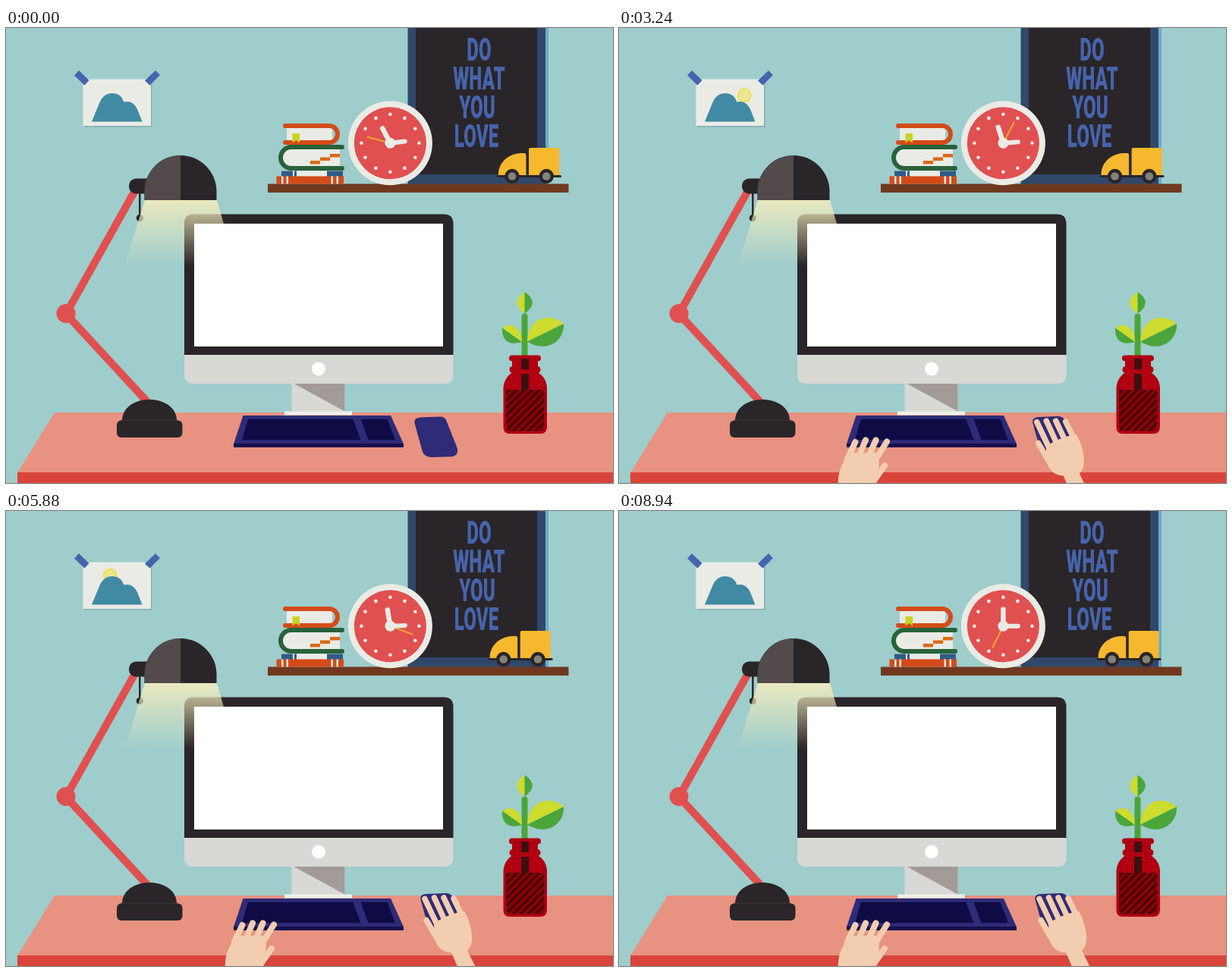
Animation of 800x600 px, one loop 9 s. Source, as an HTML page:

```html
<!DOCTYPE html>
<html lang="en">
<head>
<meta charset="utf-8">
<title>Desk</title>
<style>
  html, body { margin: 0; width: 100%; height: 100%; overflow: hidden; background: #9ecdcc; }
  svg { display: block; width: 100vw; height: 100vh; }
  .motto { font: 900 42.5px Roboto, "Liberation Sans", sans-serif; fill: #4664ad; text-anchor: middle; }
  .ink { fill: #2a2528; }
  .paper { fill: #ebebe6; }
  .lime { fill: #cddc2e; }
  .leaf { fill: #4aa53a; }
  .glass { fill: #b00012; }
  .line { fill: none; stroke-linecap: round; }
  .skin { fill: #f3cdaf; stroke: #f3cdaf; stroke-linecap: round; }
</style>
</head>
<body>
<svg viewBox="0 0 800 600" preserveAspectRatio="none">
  <defs>
    <linearGradient id="glow" gradientUnits="userSpaceOnUse" x1="0" y1="227" x2="0" y2="314">
      <stop offset="0" stop-color="#f2ebbd" stop-opacity=".9"/>
      <stop offset="1" stop-color="#f2ebbd" stop-opacity="0"/>
    </linearGradient>
    <pattern id="hatch" width="7" height="7" patternUnits="userSpaceOnUse" patternTransform="rotate(45)">
      <rect width="7" height="7" fill="#8a0009"/>
      <rect width="3" height="7" fill="#3f0808"/>
    </pattern>
    <clipPath id="sheet"><rect x="101.5" y="67.5" width="89.5" height="61"/></clipPath>
  </defs>

  <rect width="800" height="600" fill="#9ecdcc"/>

  <g id="poster">
    <rect x="711" width="4" height="206" fill="#70a9c9"/>
    <rect x="529.5" width="181.5" height="206" fill="#30486a"/>
    <rect class="ink" x="540" width="160" height="193"/>
  </g>

  <g id="sketch">
    <rect x="103" y="69" width="89.5" height="61.5" fill="#86aeb2"/>
    <rect class="paper" x="101.5" y="67.5" width="89.5" height="61.5"/>
    <g clip-path="url(#sheet)">
      <g id="sun">
        <circle r="9.7" fill="#ebdd2e"/>
        <circle r="5" fill="none" stroke="#f1e9a4" stroke-width="3" stroke-dasharray="2.2 1.7"/>
        <circle r="2.4" fill="#f1e9a4"/>
      </g>
    </g>
    <path d="M113 123.5L123.500 98Q128.500 86 140 86Q151.500 86 155.500 97.500Q167 95 173 107L179.500 123.500Z" fill="#418aa4"/>
    <path d="M96 56L109.500 69L103.500 75.500L90 62.500ZM197 56L203 62L189.500 75.500L183 69.500Z" fill="#4664ad"/>
  </g>

  <rect x="345" y="205.500" width="396.500" height="11.500" fill="#70391f"/>

  <g id="books">
    <rect class="paper" x="370" y="131" width="60" height="18"/>
    <path class="line" d="M368 129H426a11 11 0 0 1 0 22H368" fill="none" stroke="#d34b18" stroke-width="6"/>
    <path d="M377.500 139H387V151.500L382.200 148L377.500 151.500Z" fill="#c8d322"/>
    <rect class="paper" x="372" y="159" width="68" height="24"/>
    <circle class="paper" cx="376" cy="171" r="12"/>
    <path class="line" d="M443 157H376a14 14 0 0 0 0 28H443" stroke="#28623a" stroke-width="6"/>
    <path d="M401 175H414V170.500H427V166H440V170.500H427V175H414V179.500H401Z" fill="#db6a12"/>
    <rect class="paper" x="363" y="188.500" width="81" height="7.500"/>
    <path d="M363 188.500H378V196H363ZM380 188.500H383V196H380ZM423 188.500H444V196H423Z" fill="#315a88"/>
    <rect x="356.500" y="195.500" width="88.500" height="10" fill="#d34b18"/>
    <path class="paper" d="M363 195.500h2.500v10h-2.500zM369.500 195.500h2.500v10h-2.500zM428.500 195.500h2.500v10h-2.500zM435.500 195.500h2.500v10h-2.500z"/>
  </g>

  <g transform="translate(506.400 151.800)">
    <circle class="paper" r="55.500"/>
    <circle r="47.500" fill="#e05050"/>
    <g id="dots" class="paper"></g>
    <path id="second" d="M0 0V-31" class="line" stroke="#eba62c" stroke-width="2.200"/>
    <path id="minute" d="M0 0V-22" class="line" stroke="#ebebe6" stroke-width="6.500"/>
    <path id="hour" d="M0 0V-19.500" class="line" stroke="#ebebe6" stroke-width="6"/>
    <circle class="paper" r="7"/>
  </g>

  <g id="truck">
    <rect x="689" y="158" width="40" height="37" rx="2.500" fill="#f5b82e"/>
    <path d="M649 195V190C651 175 664 165.500 679 165H683Q685.500 165 685.500 168V195Z" fill="#f5b82e"/>
    <rect class="ink" x="647" y="194" width="85" height="3" rx="1.500"/>
    <circle class="ink" cx="667" cy="195.500" r="9.700"/>
    <circle class="ink" cx="712.300" cy="195.500" r="9.700"/>
    <circle cx="667" cy="195.500" r="5.300" fill="#818579"/>
    <circle cx="712.300" cy="195.500" r="5.300" fill="#818579"/>
  </g>

  <path d="M64 507H800V586.500H15Z" fill="#e89281"/>
  <rect x="15" y="586" width="785" height="14" fill="#d9453a"/>

  <g id="monitor">
    <path class="ink" d="M235 432V257.500Q235 245.500 247 245.500H577.500Q589.500 245.500 589.500 257.500V432Z"/>
    <path d="M235 431H589.500V457Q589.500 469 577.500 469H247Q235 469 235 457ZM376.500 468H446.500V507H376.500Z" fill="#d8d8d4"/>
    <path d="M379.500 469H446.500V505.500Z" fill="#a39b97"/>
    <rect x="367" y="505.500" width="89" height="5" fill="#f0f0ea"/>
    <circle cx="412" cy="449.500" r="9" fill="#fff"/>
  </g>

  <g id="lamp">
    <path d="M173 209L79 377L189 496" fill="none" stroke="#e05050" stroke-width="10"/>
    <circle cx="79" cy="376.500" r="12.500" fill="#e05050"/>
    <rect class="ink" x="162" y="198.500" width="34" height="20" rx="9.500"/>
    <path d="M176.300 214V250" stroke="#2a2528" stroke-width="2.500"/>
    <circle class="ink" cx="176.300" cy="250.500" r="4.600"/>
    <path d="M183 227H278L303 314H156Z" fill="url(#glow)"/>
    <path class="ink" d="M182.500 227V215.500A47.500 47.500 0 0 1 277.500 215.500V227Z"/>
    <path d="M182.500 227V215.500A47.500 47.500 0 0 1 230 168V227Z" fill="#524a4c"/>
    <path class="ink" d="M153 518C153 500 170 490 189 490S225 500 225 518Z"/>
    <rect class="ink" x="146" y="517.500" width="86.500" height="22.500" rx="6"/>
    <path d="M151 517.300H227" stroke="#423b3e" stroke-width=".8"/>
  </g>
  <rect x="248" y="258" width="328" height="162" fill="#fff"/>

  <g id="keyboard">
    <path d="M312.500 511H507L524 548.500H300Z" fill="#2f2b78"/>
    <path d="M300 548H524V553H300Z" fill="#150f4c"/>
    <path d="M319 515.800H457.500L467.500 543.300H311ZM467.500 515.800H502.500L513 543.300H477.500Z" fill="#0f0b45"/>
  </g>

  <g id="plant">
    <rect class="leaf" x="679.500" y="376.500" width="8" height="58" rx="4"/>
    <path class="lime" d="M683.500 348Q663 362 683.500 376.500Z"/>
    <path class="leaf" d="M683.500 348Q704 362 683.500 376.500Z"/>
    <path class="lime" d="M654 396C662 388 679 391 680 414Z"/>
    <path class="leaf" d="M654 395.500C653 413 664 419 680 414Z"/>
    <path class="lime" d="M687 413.500C688 384 714 373 735 390Z"/>
    <path class="leaf" d="M687 413.500L735 390C736 414 711 429 687 413.500Z"/>
    <rect class="glass" x="663" y="431.500" width="42" height="7.800" rx="3.800"/>
    <rect class="glass" x="667" y="436" width="34" height="14"/>
    <rect class="glass" x="663.500" y="446" width="41" height="9" rx="4.300"/>
    <path class="glass" d="M671 452H697Q712 459 713 474V526Q713 535 704 535H664Q655.500 535 655.500 526V474Q657 459 671 452Z"/>
    <path d="M659 477H709.500V526Q709.500 531.500 704 531.500H664.500Q659 531.500 659 526Z" fill="url(#hatch)"/>
    <path d="M679 436H689V450H679ZM679 456H689V477H679Z" fill="#3c1010"/>
  </g>

  <g id="left" class="skin">
    <path stroke="none" d="M289 606Q287 587 297 570L303 560H340Q346 575 339 592L335 606Z"/>
    <path fill="none" stroke-width="8" d="M311.500 546L301 568M325 543.500L312 574M338.500 543.500L324 576M353 545.500L334 576M350 577L334 600"/>
  </g>

  <g id="mouse">
    <path d="M546 513.500L572 512.500Q578 512.500 580 517L594 552Q598 563 588 565.200L561 566Q552 566 549 559L538.500 521Q537 514 546 513.500Z" fill="#2f2b78"/>
    <g id="right" class="skin">
      <path stroke="none" d="M556 552Q575 540 596 536Q607 556 606 575Q605 584 600 588L614 616H590L579 591Q562 590 557 573Z"/>
      <path fill="none" stroke-width="7.500" d="M544 520L562 558M556.500 518.500L572 552M569 518.500L584 550M582 519.500L595 546M546 548L560 572"/>
    </g>
  </g>
</svg>
<script>
const $ = id => document.getElementById(id);
const LOOP = 9000, STEP = 60;

const svgEl = (parent, tag, attrs, text = '') => {
  const el = document.createElementNS('http://www.w3.org/2000/svg', tag);
  for (const k in attrs) el.setAttribute(k, attrs[k]);
  el.textContent = text;
  parent.append(el);
};

['DO', 'WHAT', 'YOU', 'LOVE'].forEach((word, i) =>
  svgEl($('poster'), 'text', {
    class: 'motto',
    transform: `translate(${[623.5, 623.5, 621, 620][i]} ${43 + 38 * i}) scale(.57 1)`
  }, word));

for (let i = 0; i < 12; i++) {
  const a = i * Math.PI / 6;
  svgEl($('dots'), 'circle', { cx: 38 * Math.sin(a), cy: -38 * Math.cos(a), r: 2.3 });
}

const linear = x => x;
const smooth = x => x * x * (3 - 2 * x);
const settle = x => x * (2 - x);

// Value at time t on a list of [time, value] keys, in seconds
function track(t, keys, ease = linear) {
  if (t <= keys[0][0]) return keys[0][1];
  for (let i = 1; i < keys.length; i++) {
    const [t0, a] = keys[i - 1], [t1, b] = keys[i];
    if (t <= t1) return a + (b - a) * ease((t - t0) / (t1 - t0));
  }
  return keys[keys.length - 1][1];
}

const sunAngle = [[.3, -105], [.96, -71], [1.38, -51], [2.16, -4], [3.3, 71], [3.9, 108]];
const sunFade = [[.5, 0], [.96, .45], [1.38, .7], [1.9, 1], [2.6, 1], [3.3, .6], [3.8, 0]];
const truckX = [[0, 0], [.96, -13.5], [2.16, -14.3], [4.44, -12.5], [5.88, -11.3], [7.8, -9], [8.94, -17.3]];
const mouseX = [[.4, 0], [.96, -2], [2.16, 15], [4.44, -3], [5.88, 8], [7.8, 10]];
const mouseY = [[2.16, 0], [4.44, -1], [5.88, -8.5]];

const move = (id, x, y) => $(id).setAttribute('transform', `translate(${x} ${y})`);
const turn = (id, deg) => $(id).setAttribute('transform', `rotate(${deg})`);

function draw(ms) {
  const t = ms / 1000;

  turn('second', -75 + 31.5 * t);
  turn('minute', -27.5 + 3.07 * t);
  turn('hour', 83 + .78 * t);

  const day = t % (LOOP / 2000);
  const a = track(day, sunAngle) * Math.PI / 180;
  move('sun', 150 + 16.5 * Math.sin(a), 95.5 - 16.5 * Math.cos(a));
  $('sun').setAttribute('opacity', track(day, sunFade));

  move('truck', track(t, truckX), 0);
  move('left', 0, track(t, [[.4, 75], [1.2, 0]], settle));
  move('mouse', track(t, mouseX, smooth), track(t, mouseY, smooth));
  move('right', 0, track(t, [[.4, 100], [.96, 0]], settle));
}

const start = performance.now();
function tick() {
  const ms = (performance.now() - start) % LOOP;
  draw(Math.floor(ms / STEP) * STEP);
  requestAnimationFrame(tick);
}
tick();
</script>
</body>
</html>
```
